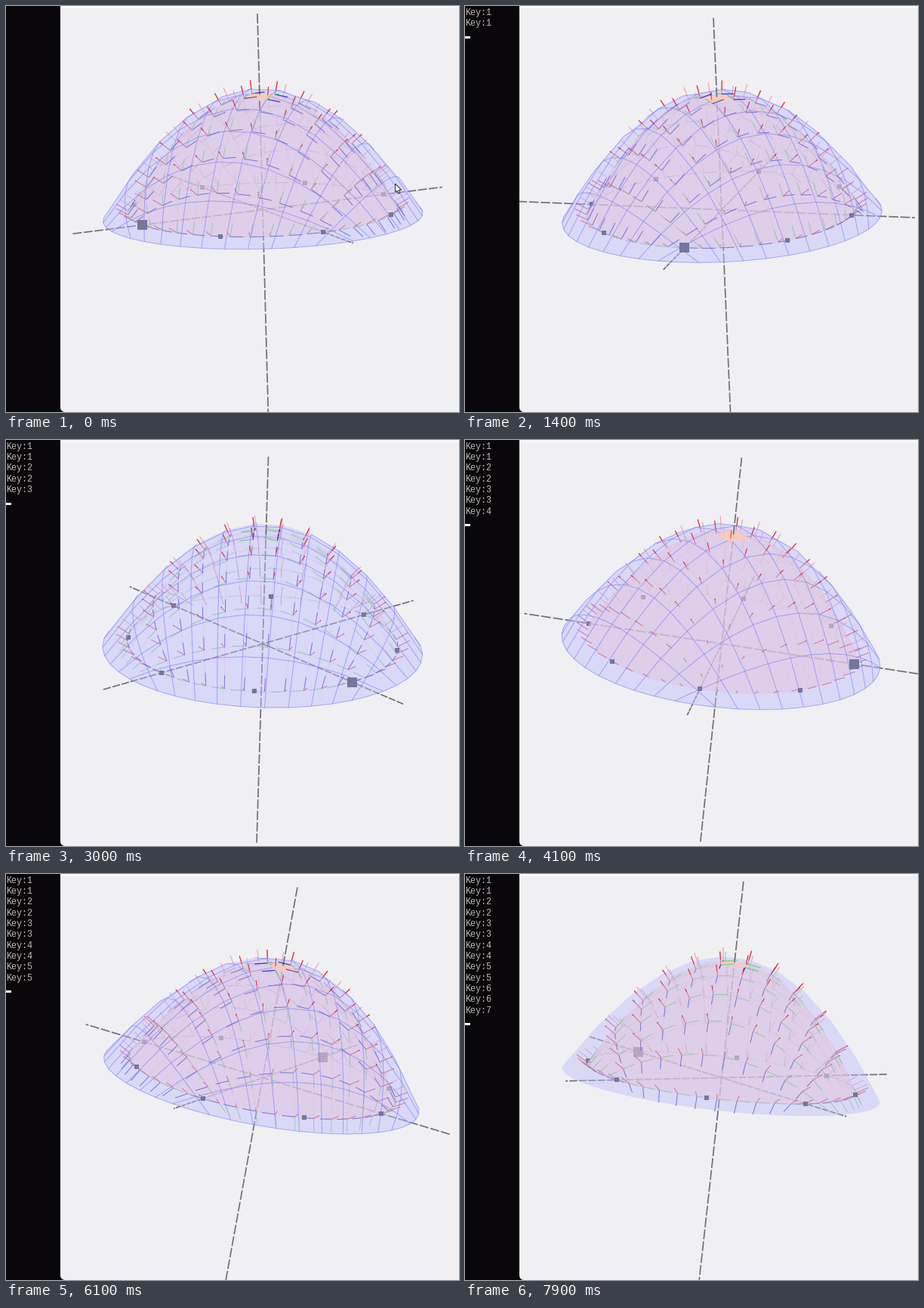
A matplotlib script for the animation above (8 s loop, 600 by 537 pixels).

```python
import numpy as np
import matplotlib.pyplot as plt
from matplotlib.animation import FuncAnimation
from matplotlib.collections import LineCollection
from matplotlib.patches import Polygon, Rectangle

W, H, DPI = 600, 537, 64
PX = 72 / DPI                     # points per pixel
FRAMES, STEP = 80, 100            # frame count, ms
CENTER = np.array([340.0, 269.5])
R_IN, H_IN = 178.8, 155.5         # inner paraboloid
R_OUT, Z_OUT, H_OUT = 212.0, -10.0, 161.0
N, TICK = 11, 18.0
KEY_GAP = 0.58                    # seconds between key presses


def disc(n):
    """Rational biquadratic unit disc with its corners on the x and y axes."""
    t = np.linspace(0, 1, n + 1)
    b = np.stack([(1 - t) ** 2, 2 * t * (1 - t), t ** 2])
    s = np.sqrt(0.5)
    wt = np.array([[1, s, 1], [s, 1, s], [1, s, 1]])
    cp = np.array([[-s, -2 * s, -s], [0, 0, 0], [s, 2 * s, s]])
    blend = lambda c: b.T @ c @ b
    p, q = blend(cp * wt) / blend(wt), blend(cp.T * wt) / blend(wt)
    return (p + q) * s, (p - q) * s


def dome(radius, base, top):
    x, y = disc(N)
    z = base + (top - base) * (1 - x ** 2 - y ** 2)
    return np.stack([x * radius, y * radius, z], axis=-1)


def unit(v):
    return v / np.linalg.norm(v, axis=-1, keepdims=True)


def normals(pts, radius, rise):
    k = 2 * rise / radius ** 2
    return unit(np.stack([k * pts[..., 0], k * pts[..., 1], np.ones(pts.shape[:-1])], -1))


def grid_edges(a):
    """Pairs of neighbouring grid points, shape (m, 2, 3)."""
    u = np.stack([a[:-1], a[1:]], 2).reshape(-1, 2, 3)
    v = np.stack([a[:, :-1], a[:, 1:]], 2).reshape(-1, 2, 3)
    return np.concatenate([u, v])


def ticks(base, vec, start=0.0):
    return np.stack([base + vec * start, base + vec], 1)


inner, outer = dome(R_IN, 0, H_IN), dome(R_OUT, Z_OUT, H_OUT)
in_edges, out_edges = grid_edges(inner), grid_edges(outer)
edge_normals = normals(out_edges.mean(1), R_OUT, H_OUT - Z_OUT)

base = inner.reshape(-1, 3)
norm = normals(base, R_IN, H_IN)
tan_u = -unit(np.gradient(inner, axis=0)).reshape(-1, 3)
tan_v = -unit(np.gradient(inner, axis=1)).reshape(-1, 3)
r2 = (base[:, :2] ** 2).sum(1)
gap = (H_OUT - (H_OUT - Z_OUT) * r2 / R_OUT ** 2 - base[:, 2]) * norm[:, 2]
poke = np.clip(gap / TICK, 0, 1)[:, None]
apex = r2 < 30 ** 2

FRAME = {
    "red": ticks(base, norm * TICK),
    "blue": ticks(base, tan_u * TICK),
    "green": ticks(base, tan_v * TICK),
}
TIPS = ticks(base, norm * TICK, poke)

ang = np.arange(8) * np.pi / 4
marks = np.stack([np.cos(ang), np.sin(ang), 0 * ang], 1) * R_IN
mark_size = np.where(np.arange(8) == 0, 13.0, 6.0)


def dashes(direction, start, stop, period=16.0, on=13.2):
    s = np.arange(start, stop, period)
    e = np.minimum(s + on, stop)
    d = np.array(direction, float)
    return np.stack([s[:, None] * d, e[:, None] * d], 1)


FAR, NEAR = 1.49 * R_IN, 1.575 * R_IN
axes_low = np.concatenate([
    dashes((-1, 0, 0), -NEAR, FAR),
    dashes((0, -1, 0), -NEAR, FAR),
    dashes((0, 0, 1), -NEAR, H_OUT),
])
axis_top = dashes((0, 0, 1), H_IN, FAR)


def view(t):
    """Rows: screen x, screen y (down), depth towards the viewer."""
    t += 0.09 * max(0, 1 - t)     # the spin starts a little slow
    turn = np.radians(217 - 36 * t)
    roll = np.radians(3.85 + 6.5 * np.cos(turn))
    tilt = np.radians(14.9 + 6.2 * np.sin(turn))
    phi = np.radians(155.4 - 36 * t - 1.7 * np.cos(turn))
    c, s, ce, se = np.cos(phi), np.sin(phi), np.cos(tilt), np.sin(tilt)
    x = np.array([c, -s, 0])
    y = np.array([s * se, c * se, -ce])
    depth = np.array([s * ce, c * ce, se])
    cr, sr = np.cos(roll), np.sin(roll)
    return np.stack([x * cr - y * sr, x * sr + y * cr]), depth


def hull(pts):
    pts = sorted(map(tuple, pts))

    def chain(seq):
        out = []
        for p in seq:
            while len(out) > 1:
                (ax_, ay), (bx, by) = out[-2:]
                if (bx - ax_) * (p[1] - ay) - (by - ay) * (p[0] - ax_) > 0:
                    break
                out.pop()
            out.append(p)
        return out[:-1]

    return np.array(chain(pts) + chain(pts[::-1]))


def rgb(*c):
    return tuple(v / 255 for v in c)


BG, BLACK = rgb(240, 239, 242), rgb(9, 7, 10)
COLORS = {"red": rgb(230, 25, 45), "blue": rgb(35, 30, 165), "green": rgb(95, 210, 105)}

fig = plt.figure(figsize=(W / DPI, H / DPI), dpi=DPI, facecolor=BG)
ax = fig.add_axes([0, 0, 1, 1])
ax.set(xlim=(0, W), ylim=(H, 0))
ax.axis("off")


def lines(color, width, z, alpha=1.0):
    lc = LineCollection([], colors=[color], linewidths=width * PX, alpha=alpha, zorder=z)
    lc.set_capstyle("butt")
    return ax.add_collection(lc, autolim=False)


def area(color, alpha, z):
    return ax.add_patch(Polygon(np.zeros((3, 2)), fc=color, ec="none", lw=0, alpha=alpha, zorder=z))


def squares(z):
    return ax.scatter([], [], marker="s", color=rgb(60, 60, 68), linewidths=0, zorder=z)


GREY = rgb(112, 112, 114)
axis_lines = lines(GREY, 1.7, 1)
axis_over = lines(GREY, 1.7, 9)
in_mesh = lines(rgb(255, 130, 165), 0.8, 2, 0.28)
rear = {k: lines(c, 1.0, 3, 0.4) for k, c in COLORS.items()}
rear_marks = squares(3)
in_fill = area(rgb(253, 209, 197), 0.6, 4)
front = {k: lines(c, 1.0, 5, 0.85) for k, c in COLORS.items()}
front_marks = squares(5.5)
out_fill = area(rgb(190, 190, 255), 0.45, 6)
out_mesh = lines(rgb(115, 115, 245), 0.9, 7, 0.6)
cap = area(rgb(255, 203, 184), 0.85, 8)
over = {k: lines(c, 1.1, 10, 0.75) for k, c in COLORS.items()}

# window edge and terminal strip
ax.add_patch(Rectangle((72, 0), W - 72, 2.5, fc="white", lw=0, alpha=0.6, zorder=0))
ax.add_patch(Rectangle((0, 0), 72, H, fc=BLACK, lw=0, zorder=20))
a = np.linspace(np.pi / 2, np.pi, 8)
corner = np.stack([78 + 6 * np.cos(a), H - 6 + 6 * np.sin(a)], 1)
ax.add_patch(Polygon(np.vstack([[72, H], corner]), fc=BLACK, lw=0, zorder=20))

ROW = 14.33
rows = [
    ax.text(0, 7.2 + ROW * i, f"Key:{i // 2 + 1}", family="Liberation Mono",
            fontsize=11.8 * PX, color=rgb(190, 186, 184), va="center_baseline", zorder=21)
    for i in range(13)
]
cursor = ax.add_patch(Rectangle((0, 0), 7, 3, fc="white", lw=0, zorder=21))

ARROW = np.array([(0, 0), (0, 11.5), (2.6, 9.2), (4.3, 13.2), (6.2, 12.3), (4.5, 8.5), (8, 8.2)])
pointer = ax.add_patch(Polygon(ARROW + (515.5, 235), fc="white", ec=rgb(40, 40, 45),
                               lw=PX, zorder=22))


def draw(i):
    t = i * STEP / 1000
    presses = int(t / KEY_GAP + 1e-6)
    shown = lambda key: not presses == 2 * key - 1
    m, depth = view(t)
    flat = lambda p: CENTER + p @ m.T

    axis_lines.set_segments(flat(axes_low))
    axis_over.set_segments(flat(axis_top))

    near = marks @ depth > 0
    for art, sel in ((rear_marks, ~near), (front_marks, near)):
        art.set_offsets(flat(marks[sel]))
        art.set_sizes((mark_size[sel] * PX) ** 2)
        art.set_visible(shown(1))

    in_mesh.set_segments(flat(in_edges))
    in_mesh.set_visible(shown(2))
    in_fill.set_xy(hull(flat(base)))
    in_fill.set_visible(shown(3))
    cap.set_xy(flat(inner[[5, 6, 6, 5], [5, 5, 6, 6]]))
    cap.set_visible(shown(3))

    facing = norm @ depth > 0
    for k, seg in FRAME.items():
        rear[k].set_segments(flat(seg[~facing]))
        front[k].set_segments(flat(seg[facing]))
        top = TIPS[facing] if k == "red" else seg[apex]
        over[k].set_segments(flat(top))
        for group in (rear, front, over):
            group[k].set_visible(shown(5 if k == "red" else 4))

    out_fill.set_xy(hull(flat(outer.reshape(-1, 3))))
    out_fill.set_visible(shown(6))
    out_mesh.set_segments(flat(out_edges[edge_normals @ depth > -0.03]))
    out_mesh.set_visible(shown(7))

    for n, row in enumerate(rows):
        row.set_visible(n < presses)
    cursor.set_y(11 + ROW * presses)
    cursor.set_visible(presses > 0)
    pointer.set_visible(presses == 0)
    return []


anim = FuncAnimation(fig, draw, frames=FRAMES, interval=STEP, repeat=True,
                     repeat_delay=0, init_func=lambda: draw(0), blit=False)
plt.show()
```
